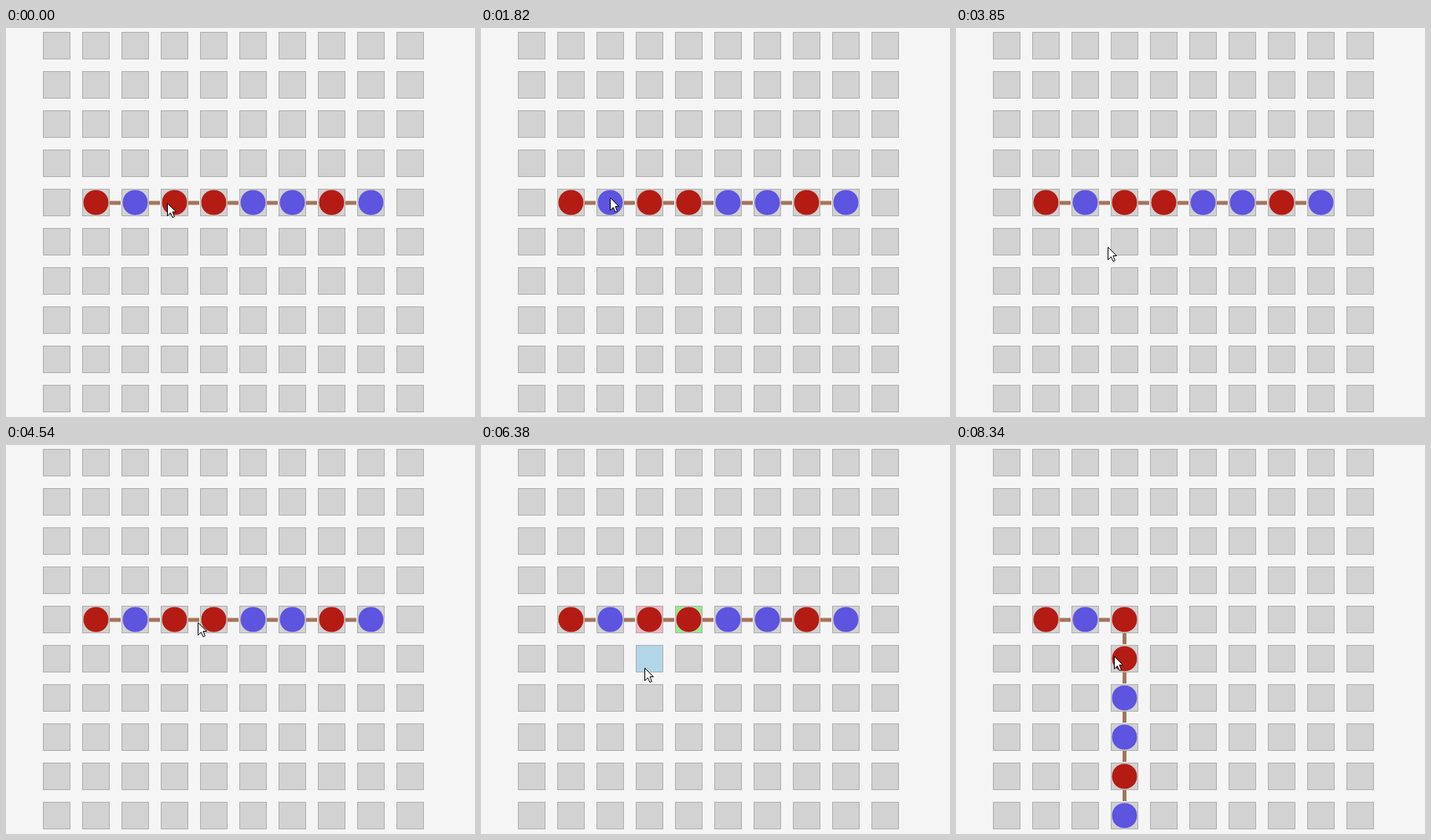
These frames come from a looping animation (597 by 496 pixels, 8900 ms). An HTML page:

```html
<!DOCTYPE html>
<html lang="en">
<head>
<meta charset="utf-8">
<title>Chain on a lattice</title>
<style>
  html, body { margin: 0; width: 100%; height: 100%; overflow: hidden; background: #f5f5f5; }
  svg { display: block; }
  .cell { fill: #d2d2d2; stroke: #adadad; }
  .green { fill: #92ee84; }
  .pink { fill: #fab4bf; }
  .blue { fill: #b2d6e7; }
  .link { fill: #a3755c; }
  circle { stroke: #d2d2d2; }
  .H { fill: #b41c13; }
  .P { fill: #5d54df; }
  #press { fill: #ff0; fill-opacity: .47; stroke: none; }
  #arrow { fill: #fff; stroke: #000; }
</style>
</head>
<body>
<svg width="597" height="496" viewBox="0 0 597 496">
  <g id="cells"></g>
  <g id="straight"></g>
  <g id="bent"></g>
  <path id="arrow" d="M.5 .5V16.5L4.4 12.8L7 18.5L9.4 17.5L7 11.5H11.5Z"/>
  <circle id="press" r="12.5"/>
</svg>
<script>
const LOOP = 8900, FRAME = 62, PITCH = 50, SIZE = 10;
const CHAIN = 'HPHHPPHP';
const $ = id => document.getElementById(id);

function add(parent, tag, attrs) {
  const el = document.createElementNS('http://www.w3.org/2000/svg', tag);
  for (const k in attrs) el.setAttribute(k, attrs[k]);
  parent.appendChild(el);
  return el;
}

const cells = Array.from({ length: SIZE * SIZE }, (_, i) => add($('cells'), 'rect', {
  x: 47.5 + i % SIZE * PITCH, y: 5.5 + Math.floor(i / SIZE) * PITCH, width: 34, height: 34
}));

// Places the chain on the lattice, turning down after the given bead.
function drawChain(group, turn) {
  [...CHAIN].forEach((kind, i) => {
    const down = Math.max(0, i - turn);
    const x = 64.5 + (1 + i - down) * PITCH;
    const y = 22.5 + (4 + down) * PITCH;
    if (i) add(group, 'rect', down
      ? { class: 'link', x: x - 2.5, y: y - 32.5, width: 5, height: 14 }
      : { class: 'link', x: x - 32.5, y: y - 2, width: 14, height: 5 });
    add(group, 'circle', { class: kind, cx: x, cy: y, r: 16.5 });
  });
}
drawChain($('straight'), CHAIN.length);
drawChain($('bent'), 2);

// Each move eases to a point; bow bends the way there, swing curls it into a loop.
const moves = [
  { from: 60, to: 120, end: [210, 224] },
  { from: 1120, to: 1500, end: [164, 216] },
  { from: 2250, to: 2250, end: [160, 220] },
  { from: 2450, to: 3340, end: [153, 262], bow: [0, 50], swing: -25 },
  { from: 3410, to: 3850, end: [193, 279], bow: [0, -12] },
  { from: 3910, to: 4290, end: [178, 266], bow: [-10, 13] },
  { from: 4350, to: 5010, end: [265, 226], bow: [50, -35] },
  { from: 5330, to: 5540, end: [215, 225] },
  { from: 5950, to: 6140, end: [230, 271] },
  { from: 6200, to: 6380, end: [208, 284], bow: [18, 28] },
  { from: 6450, to: 6640, end: [215, 269] },
  { from: 7460, to: 8340, end: [201, 269], bow: [0, 20], swing: 14 }
];
moves.reduce((start, m) => { m.start = start; return m.end; }, [205, 223]);

function pointer(t) {
  const m = moves.findLast(m => t >= m.from);
  if (!m) return moves[0].start;
  const { from, to, start, end, bow = [0, 0], swing = 0 } = m;
  const gaps = Math.round((to - from) / FRAME);
  const shown = gaps ? Math.floor((t - from) / (to - from) * gaps + 1e-6) : 0;
  const u = Math.min(1, (shown + 1) / (gaps + 1));
  const ease = (u + u * u * (3 - 2 * u)) / 2;
  const curl = [swing * Math.sin(2 * Math.PI * ease), 0];
  return start.map((a, d) =>
    Math.round(a + (end[d] - a) * ease + bow[d] * Math.sin(Math.PI * ease) + curl[d]));
}

// A click flashes when pressed; a little later the marked cells change.
const clicks = [
  { press: 710, apply: 800, marks: { 43: 'green' } },
  { press: 1690, apply: 1820, marks: {} },
  { press: 5140, apply: 5270, marks: { 44: 'green' } },
  { press: 5720, apply: 5850, marks: { 44: 'green', 43: 'pink', 53: 'blue' } },
  { press: 6810, apply: 7010, marks: {}, folds: true }
];
const show = (el, on) => el.setAttribute('visibility', on ? 'visible' : 'hidden');

function draw(t) {
  const [x, y] = pointer(t);
  $('arrow').setAttribute('transform', `translate(${x} ${y})`);
  $('press').setAttribute('transform', `translate(${x + .5} ${y + .5})`);
  show($('press'), clicks.some(c => t >= c.press && t < c.press + 50));
  const { marks = {}, folds = false } = clicks.findLast(c => t >= c.apply) || {};
  show($('straight'), !folds);
  show($('bent'), folds);
  cells.forEach((cell, i) => cell.setAttribute('class', 'cell ' + (marks[i] || '')));
}

const t0 = performance.now();
function tick() {
  draw((performance.now() - t0) % LOOP);
  requestAnimationFrame(tick);
}
tick();
</script>
</body>
</html>
```
